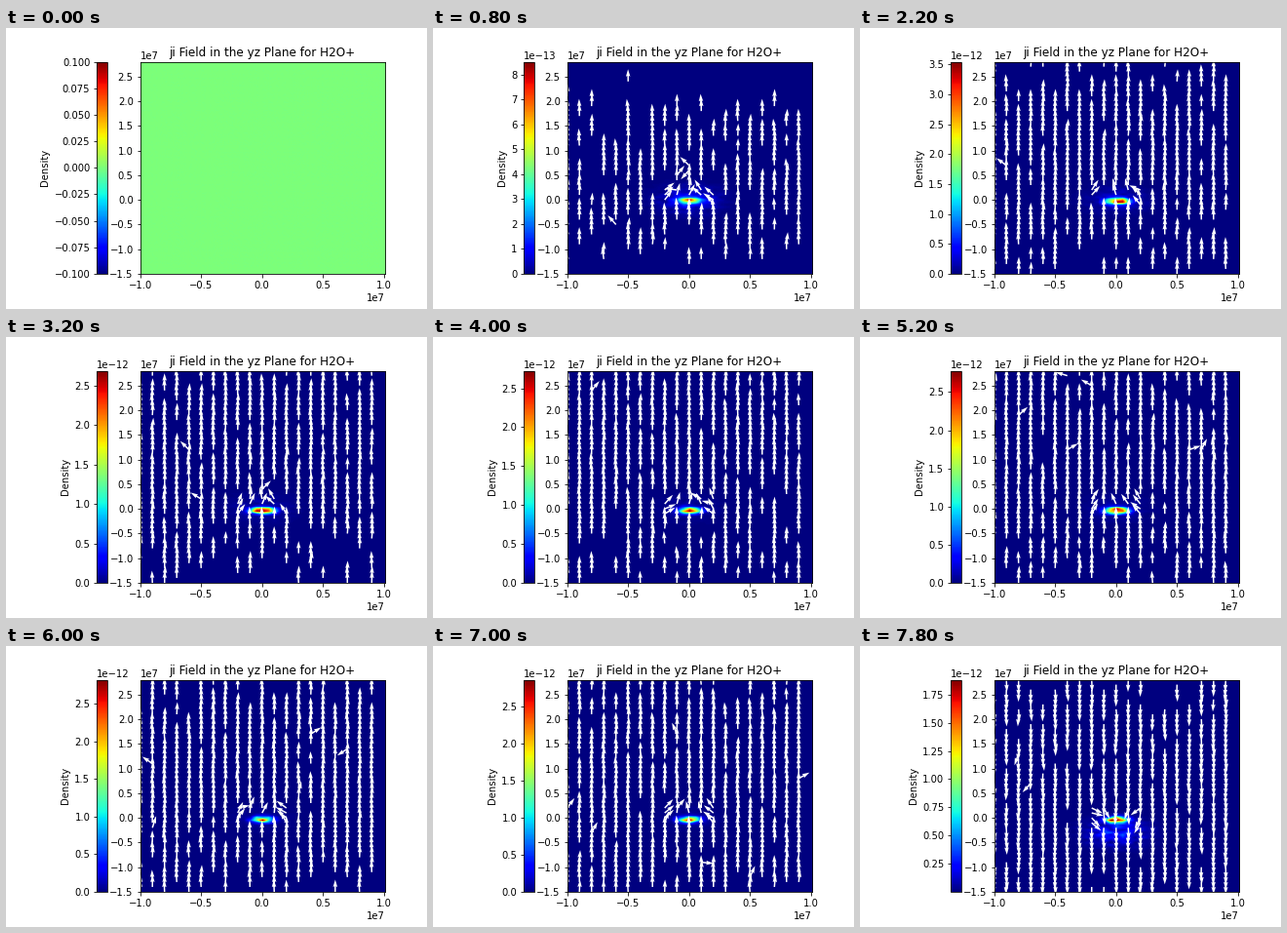
Recreate the animation shown at these times as a matplotlib script. Size 432 by 288 pixels, loop 8 s.

```python
import numpy as np
import matplotlib.pyplot as plt
from matplotlib.animation import FuncAnimation

FRAMES, STEP = 40, 200
FLIP = 37                      # step at which the flow turns downward
SPEED = 3                      # rows travelled per step
HALF = .25e6                   # half a density cell

plt.rcParams["figure.subplot.bottom"] = .125
fig = plt.figure(figsize=(6, 4), dpi=72)

# Positions in units of 1e6: a coarse grid for arrows, a finer one for density.
AX, AY = np.meshgrid(np.arange(-10, 10), np.arange(-15, 29))
X, Y = np.meshgrid(np.arange(-10, 10.6, .5), np.arange(-15, 28.1, .5))

# Noise smoothed along y, so that arrows gather into vertical streaks.
raw = np.random.default_rng(4).normal(size=(160, AX.shape[1]))
soft = raw + .5 * (np.roll(raw, 1, axis=0) + np.roll(raw, -1, axis=0))
streaks = soft.ravel().argsort().argsort().reshape(raw.shape) / raw.size


def growth(k):
    return 1 - np.exp(-k / 8)


def peak(k):
    return 1e-12 * np.interp(k, (0, 4, 11, 16, 36, 39),
                             (0, .851, 3.544, 2.69, 2.87, 1.88))


def blob(cx, cy, sx, sy):
    return np.exp(-((X - cx) / sx) ** 2 - ((Y - cy) / sy) ** 2)


def density(k, rng):
    falling = k >= FLIP
    core = blob(0, -.4 * growth(k), .8, .55) * rng.uniform(.4, 1, X.shape)
    haze = .03 + .3 * np.exp(-k / 5) + .15 * falling
    halo = blob(0, -3 * falling, 2.2, 2.4) * rng.uniform(.1, 1, X.shape)
    z = core + haze * halo
    return z / z.max()


def arrows(k, rng):
    grown = growth(k)
    mid = 2 + 10 * np.sin(np.pi * k / FRAMES) ** 2
    reach = 5 + 22 * grown
    chance = (.6 + .3 * grown) * np.exp(-np.abs((AY - mid) / reach) ** 3)

    rows = SPEED * (k if k < FLIP else 2 * FLIP - k)
    shown = np.roll(streaks, rows, axis=0)[:len(AY)] < chance
    shown &= (np.abs(AX) > 1) | (np.abs(AY + .5) > 1)

    tilt = rng.normal(0, .04, AX.shape)
    tilt += (rng.random(AX.shape) < .01) * rng.normal(0, .9, AX.shape)
    near = (np.abs(AX) <= 2) & (np.abs(AY - .5) < 2)
    tilt += near * (rng.normal(0, .3, AX.shape) - .35 * AX)
    u, v = np.sin(tilt), np.cos(tilt) * (1 if k < FLIP else -1)
    return [a[shown] for a in (1e6 * AX, 1e6 * AY, u, v)]


def draw(k):
    fig.clear()
    ax = fig.add_subplot()
    rng = np.random.default_rng(100 + k)
    if k == 0:
        z, lo, hi = np.zeros(X.shape), -.1, .1
    else:
        hi = peak(k)
        lo = .0015 * hi if k >= FLIP else 0
        z = hi * density(k, rng)
    im = ax.imshow(z, cmap="jet", vmin=lo, vmax=hi, origin="lower",
                   aspect="auto", interpolation="bilinear",
                   extent=(-1e7 - HALF, 1.05e7 + HALF,
                           -1.5e7 - HALF, 2.8e7 + HALF))
    if k:
        ax.quiver(*arrows(k, rng), color="white", scale=20, width=.006)
    ax.set_xlim(-1e7, 1.008e7)
    ax.set_ylim(-1.5e7, 2.8e7)
    ax.set_title("ji Field in the yz Plane for H2O+")
    fig.colorbar(im, ax=ax, location="left", label="Density")
    return []


anim = FuncAnimation(fig, draw, frames=FRAMES, init_func=lambda: draw(0),
                     interval=STEP, repeat=True, repeat_delay=0, blit=False)
plt.show()
```
